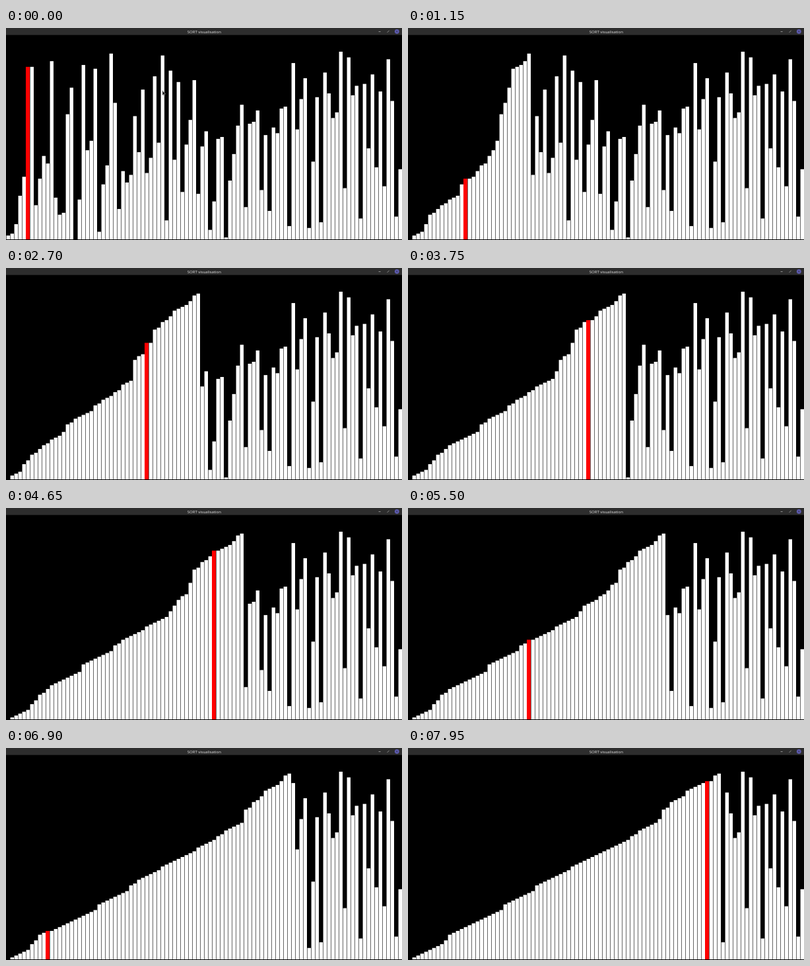
An HTML page with a canvas that plays this animation: 600x321 px, repeating every 8000 ms.

```html
<!DOCTYPE html>
<html lang="en">
<head>
<meta charset="utf-8">
<title>SORT visualisation</title>
<style>
  html, body { margin: 0; width: 100%; height: 100%; overflow: hidden; background: #000; }
  canvas { display: block; width: 600px; height: 321px; }
</style>
</head>
<body>
<canvas width="600" height="321"></canvas>
<script>
const ctx = document.querySelector('canvas').getContext('2d');
const LOOP = 8000, TICK = 50, PITCH = 6, UNIT = 2.87, FLOOR = 320;
const CURSOR_GONE = 400;

// A shuffle of 0..99 whose first six entries are already sorted.
const values = [
  2, 3, 8, 23, 33, 91, 19, 18, 32, 44, 40, 94, 22, 13, 14, 66, 80, 0, 21, 92,
  47, 52, 90, 4, 29, 39, 98, 72, 16, 36, 30, 34, 65, 46, 79, 35, 43, 86, 51, 97,
  10, 89, 42, 83, 25, 50, 63, 84, 24, 49, 57, 5, 20, 53, 54, 1, 31, 45, 60, 71,
  17, 61, 62, 68, 26, 55, 15, 59, 56, 69, 70, 7, 93, 58, 74, 85, 6, 41, 75, 9,
  88, 77, 64, 67, 99, 27, 96, 76, 81, 11, 82, 48, 87, 38, 78, 28, 95, 73, 12, 37
];

// Pace of the sort: [time, index being inserted, highlighted bar].
const pace = [
  [0, 6, 5], [1150, 30, 14], [2700, 48, 35], [3750, 54, 45],
  [5500, 64, 30], [6900, 71, 10], [7950, 78, 75]
];

function recordInsertionSort(first, last) {
  const steps = [];
  const bars = values.slice();
  for (let i = first; i <= last; i++) {
    const key = bars[i];
    let j = i - 1;
    for (; j >= 0 && bars[j] > key; j--) {
      bars[j + 1] = bars[j];
      steps.push({ i, j, bars: bars.slice() });
    }
    bars[j + 1] = key;
  }
  return steps;
}

const steps = recordInsertionSort(6, 78);
const marks = pace.map(([time, i, j]) => ({
  time, step: steps.findIndex(s => s.i === i && s.j === j)
}));

function stepAt(time) {
  const n = marks.findIndex(m => m.time >= time);
  if (n <= 0) return steps[marks[0].step];
  const a = marks[n - 1], b = marks[n];
  const part = (time - a.time) / (b.time - a.time);
  return steps[Math.round(a.step + part * (b.step - a.step))];
}

function strokeLine(color, width, ...points) {
  ctx.strokeStyle = color;
  ctx.lineWidth = width;
  ctx.beginPath();
  for (const [x1, y1, x2, y2] of points) {
    ctx.moveTo(x1, y1);
    ctx.lineTo(x2, y2);
  }
  ctx.stroke();
}

function drawTitleBar() {
  ctx.fillStyle = '#2d2d2d';
  ctx.fillRect(0, 0, 600, 10.6);
  ctx.fillStyle = '#e4e4e4';
  ctx.font = '500 6px "Open Sans", "Noto Sans", sans-serif';
  ctx.textAlign = 'center';
  ctx.fillText('SORT visualisation', 300.3, 7.8);
  strokeLine('#a8a8a8', 0.8, [564.6, 5.5, 567.6, 5.5]);
  strokeLine('#a8a8a8', 0.8, [577.6, 6.8, 580.6, 3.8]);
  ctx.fillStyle = '#5e5cb0';
  ctx.beginPath();
  ctx.arc(592.3, 5.3, 3.4, 0, Math.PI * 2);
  ctx.fill();
  strokeLine('#2d2d4a', 0.7, [591, 4, 593.6, 6.6], [593.6, 4, 591, 6.6]);
}

function drawBars({ bars, j }) {
  bars.forEach((value, k) => {
    const active = k === j;
    const inset = active ? 0 : 0.6;
    const height = value * UNIT;
    ctx.fillStyle = active ? '#f00' : '#fff';
    ctx.fillRect(k * PITCH + inset, FLOOR - height, PITCH - inset, height);
  });
}

function drawCursor() {
  ctx.fillStyle = '#111';
  ctx.strokeStyle = '#ccc';
  ctx.lineWidth = 0.6;
  ctx.beginPath();
  ctx.moveTo(237, 94.5);
  ctx.lineTo(237, 102);
  ctx.lineTo(238.6, 100.6);
  ctx.lineTo(239.6, 103);
  ctx.lineTo(240.5, 102.6);
  ctx.lineTo(239.6, 100.3);
  ctx.lineTo(241.5, 100);
  ctx.closePath();
  ctx.fill();
  ctx.stroke();
}

function draw() {
  const now = performance.now() % LOOP;
  const time = Math.floor(now / TICK) * TICK;
  ctx.fillStyle = '#000';
  ctx.fillRect(0, 0, 600, 321);
  drawTitleBar();
  drawBars(stepAt(time));
  if (time < CURSOR_GONE) drawCursor();
  requestAnimationFrame(draw);
}
draw();
</script>
</body>
</html>
```
